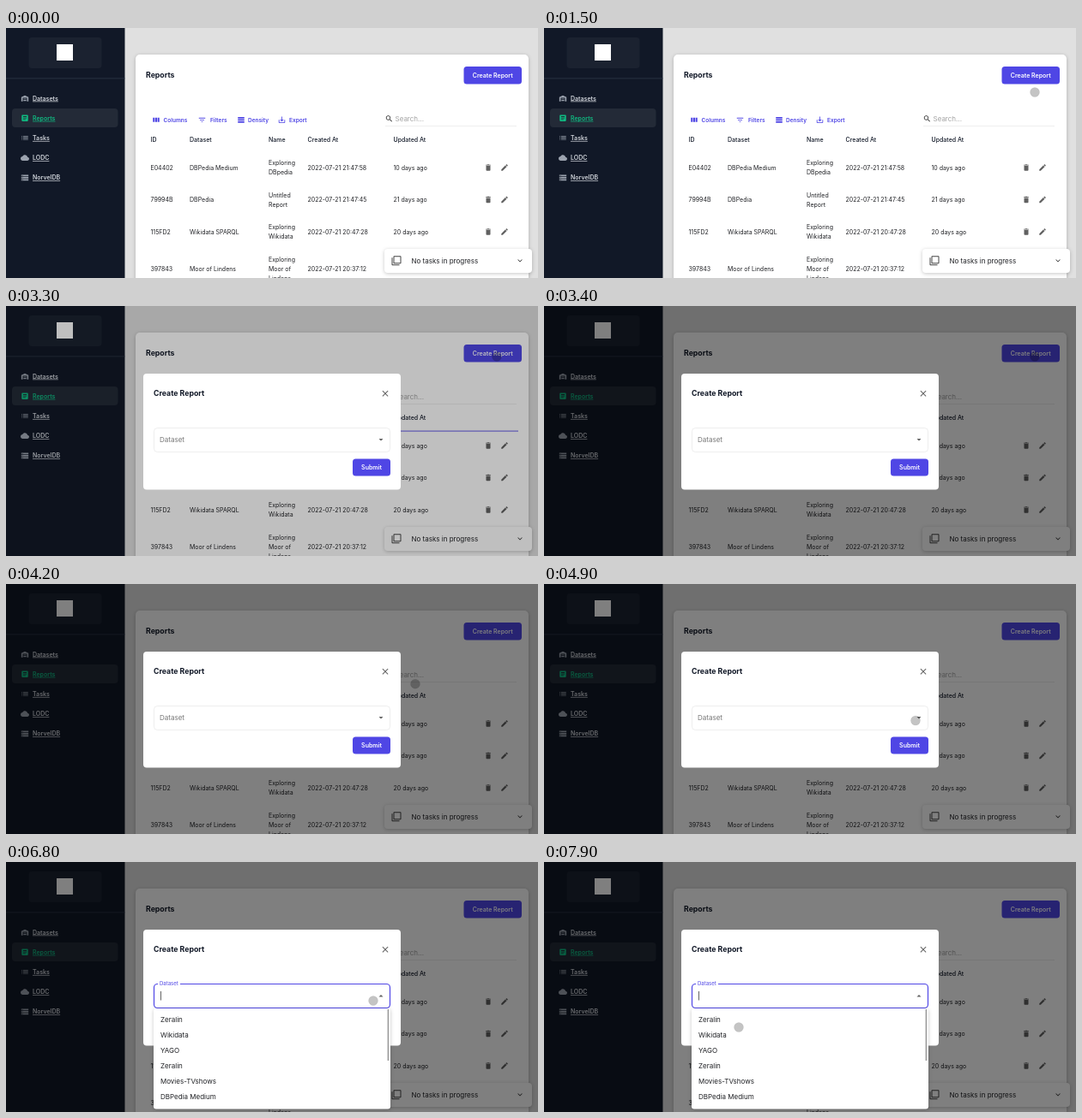
An HTML page that plays this animation: 620x292 px, repeating every 8 s.

```html
<!DOCTYPE html>
<html lang="en">
<head>
<meta charset="utf-8">
<title>Create report</title>
<style>
html, body { margin: 0; height: 100%; overflow: hidden; background: #e0e0e0; }
svg { display: block; width: 100%; height: 100%; font-family: Inter, Roboto, sans-serif; }
.float { filter: drop-shadow(0 1px 2px rgba(0, 0, 0, .22)); }
</style>
</head>
<body>
<svg id="stage" viewBox="0 0 620 292"></svg>
<script>
const INDIGO = '#4f46e5', INK = '#111827', GREY = '#616161';

const ICONS = {
  house: 'M2 9l10-5 10 5v12h-4V11H6v10H2zM8 13h8v2H8zM8 17h8v3H8z',
  article: 'M19 3H5c-1.1 0-2 .9-2 2v14c0 1.1.9 2 2 2h14c1.1 0 2-.9 2-2V5c0-1.1-.9-2-2-2zm-5 14H7v-2h7v2zm3-4H7v-2h10v2zm0-4H7V7h10v2z',
  list: 'M3 13h2v-2H3zm0 4h2v-2H3zm0-8h2V7H3zm4 4h14v-2H7zm0 4h14v-2H7zM7 7v2h14V7z',
  cloud: 'M19.35 10.04C18.67 6.59 15.64 4 12 4 9.11 4 6.6 5.64 5.35 8.04 2.34 8.36 0 10.91 0 14c0 3.31 2.69 6 6 6h13c2.76 0 5-2.24 5-5 0-2.64-2.05-4.78-4.65-4.96z',
  storage: 'M2 20h20v-4H2v4zm2-3h2v2H4v-2zM2 4v4h20V4H2zm4 3H4V5h2v2zm-4 7h20v-4H2v4zm2-3h2v2H4v-2z',
  columns: 'M3 6h5v12H3zM9.500 6h5v12h-5zM16 6h5v12h-5z',
  filter: 'M10 18h4v-2h-4zM3 6v2h18V6zm3 7h12v-2H6z',
  density: 'M3 4h18v4H3zM3 10h18v4H3zM3 16h18v4H3z',
  save: 'M19 12v7H5v-7H3v7c0 1.1.9 2 2 2h14c1.1 0 2-.9 2-2v-7zm-6 .67l2.59-2.58L17 11.5l-5 5-5-5 1.41-1.41L11 12.67V3h2z',
  search: 'M15.500 14h-.79l-.28-.27A6.500 6.500 0 1 0 13.730 14.430l.27.28v.79l5 4.990L20.490 19zM9.500 14a4.500 4.500 0 1 1 0-9 4.500 4.500 0 0 1 0 9z',
  trash: 'M6 19c0 1.1.9 2 2 2h8c1.1 0 2-.9 2-2V7H6zM19 4h-3.5l-1-1h-5l-1 1H5v2h14z',
  pencil: 'M3 17.250V21h3.750L17.810 9.940l-3.750-3.750zM20.710 7.040c.39-.39.39-1.020 0-1.410l-2.340-2.340a1 1 0 0 0-1.410 0l-1.830 1.830 3.750 3.750z',
  stack: 'M3 5H1v16c0 1.1.9 2 2 2h16v-2H3zM21 1H7c-1.1 0-2 .9-2 2v14c0 1.1.9 2 2 2h14c1.1 0 2-.9 2-2V3c0-1.1-.9-2-2-2zm0 16H7V3h14z',
  chevron: 'M16.590 8.590L12 13.170 7.410 8.590 6 10l6 6 6-6z',
  close: 'M19 6.410L17.590 5 12 10.590 6.410 5 5 6.410 10.590 12 5 17.590 6.410 19 12 13.410 17.590 19 19 17.590 13.410 12z',
  drop: 'M7 9.500l5 5 5-5z'
};

// Text and icons are placed by their vertical centre.
const text = (x, y, str, size = 7, weight = 400, fill = '#1f2024', extra = '') =>
  `<text x="${x}" y="${y + size * .36}" font-size="${size}" font-weight="${weight}" fill="${fill}" ${extra}>${str}</text>`;
const rect = (x, y, w, h, fill, r = 0, extra = '') =>
  `<rect x="${x}" y="${y}" width="${w}" height="${h}" rx="${r}" fill="${fill}" ${extra}/>`;
const icon = (name, x, y, size, fill = GREY) =>
  `<path transform="translate(${x - size / 2} ${y - size / 2}) scale(${size / 24})" fill="${fill}" fill-rule="evenodd" d="${ICONS[name]}"/>`;
const button = (x, y, w, h, label) =>
  rect(x, y, w, h, INDIGO, 3.5) + text(x + w / 2, y + h / 2, label, 7, 600, '#fff', 'text-anchor="middle"');

function sidebar() {
  const items = [['house', 'Datasets'], ['article', 'Reports'], ['list', 'Tasks'], ['cloud', 'LODC'], ['storage', 'NorvelDB']];
  return rect(0, 0, 138.5, 292, INK) +
    rect(26.5, 11, 85, 36, '#1b2230', 4) + rect(59, 19, 19, 19, '#fff') +
    rect(0, 58.5, 138.5, .8, '#2d3748') +
    rect(7, 94, 123.5, 22, '#232a37', 4) +
    items.map(([name, label], i) => {
      const y = 82 + i * 23.2, on = i === 1;
      return icon(name, 22, y, 10, on ? '#10b981' : '#9ca3af') +
        text(31, y, label, 7, 600, on ? '#10b981' : '#d1d5db', 'text-decoration="underline"');
    }).join('');
}

function table() {
  const cols = [168.5, 214, 306, 351.5, 451.5];
  const tools = [['columns', 175, 'Columns', 183.5], ['filter', 228.5, 'Filters', 238],
    ['density', 274, 'Density', 282], ['save', 321.5, 'Export', 330]];
  const rows = [
    [163, 'E04402', 'DBPedia Medium', ['Exploring', 'DBpedia'], '21:47:58', 10],
    [200.5, '79994B', 'DBPedia', ['Untitled', 'Report'], '21:47:45', 21],
    [238, '115FD2', 'Wikidata SPARQL', ['Exploring', 'Wikidata'], '20:47:28', 20],
    [281, '397843', 'Moor of Lindens', ['Exploring', 'Moor of', 'Lindens'], '20:37:12', 20]
  ];
  return rect(151, 31, 458, 280, '#fff', 5, 'class="float"') +
    text(163, 55, 'Reports', 8.75, 700, INK) +
    button(533.5, 45, 67.5, 20.5, 'Create Report') +
    tools.map(([name, x, label, tx]) => icon(name, x, 107.3, 10, INDIGO) + text(tx, 107.3, label, 6.5, 600, INDIGO)).join('') +
    icon('search', 446.5, 106, 10, '#333') + text(453.5, 106, 'Search...', 8, 400, '#a3a3a3') +
    rect(442, 114, 153, .5, '#ddd') +
    ['ID', 'Dataset', 'Name', 'Created At', 'Updated At'].map((h, i) => text(cols[i], 130.5, h, 7, 500, INK)).join('') +
    rows.map(([y, id, set, name, time, days]) =>
      text(cols[0], y, id) + text(cols[1], y, set) +
      name.map((line, i) => text(cols[2], y + (i - (name.length - 1) / 2) * 11, line)).join('') +
      text(cols[3], y, '2022-07-21 ' + time) + text(cols[4], y, days + ' days ago') +
      icon('trash', 562, y, 10) + icon('pencil', 581, y, 10)).join('');
}

const toast = () => rect(441, 258, 172, 28, '#fff', 4, 'class="float"') +
  icon('stack', 455, 271.7, 12, '#444') + text(472.5, 271.7, 'No tasks in progress', 8) + icon('chevron', 599, 271.7, 11, '#444');

const modal = () => rect(160, 79, 300, 135.5, '#fff', 4) +
  text(172, 102, 'Create Report', 8.75, 700, INK) + icon('close', 442, 102.3, 12) +
  button(404, 178.5, 44, 20, 'Submit') +
  '<rect id="field" x="172.5" y="142.5" width="275" height="28" rx="4" fill="none"/>' +
  rect(177, 140, 26, 5, '#fff', 0, 'id="notch"') +
  '<text id="label" x="179">Dataset</text>' +
  `<g id="arrow">${icon('drop', 437, 156.3, 12)}</g>`;

const menu = () => rect(180, 151, .7, 10.5, '#222') +
  rect(172, 171, 276, 117.5, '#fff', 3, 'class="float"') +
  rect(444.7, 172, 1.3, 60, '#909090') +
  ['Zeralin', 'Wikidata', 'YAGO', 'Zeralin', 'Movies-TVshows', 'DBPedia Medium']
    .map((s, i) => text(180, 183.7 + i * 18, s, 8)).join('');

const $ = id => document.getElementById(id);
$('stage').innerHTML = rect(0, 0, 620, 292, '#e0e0e0') + sidebar() + table() +
  rect(163, 145.5, 434, 1.2, '#7a73ec', 0, 'id="loading"') + toast() +
  rect(0, 0, 620, 292, '#000', 0, 'id="shade"') +
  `<g id="modal">${modal()}</g><g id="menu">${menu()}</g>` +
  '<circle id="pointer" r="5.5" fill="#000" fill-opacity=".23" stroke="#000" stroke-opacity=".05"/>';

// Pointer path: time, x, y
const PATH = [[700, 480, 215], [1300, 576, 80], [1500, 572, 75], [2100, 572, 75], [2600, 572, 59],
  [3700, 572, 59], [4600, 409, 158], [4900, 433, 159.5], [6700, 433, 159.5], [6800, 428, 162],
  [6900, 428, 162], [7800, 236, 195], [7900, 227, 193]];

const ramp = (t, a, b) => Math.min(1, Math.max(0, (t - a) / (b - a)));
const mix = (a, b, k) => a + (b - a) * k;
const set = (id, attrs) => Object.entries(attrs).forEach(([k, v]) => $(id).setAttribute(k, v));

function pointerAt(t) {
  const i = Math.max(1, PATH.findIndex(p => p[0] >= t));
  const [a, x0, y0] = PATH[i - 1], [b, x1, y1] = PATH[i];
  const k = ramp(t, a, b), e = k * k * (3 - 2 * k);
  return { cx: mix(x0, x1, e), cy: mix(y0, y1, e), opacity: t < 700 ? 0 : 1 };
}

function draw(now) {
  const t = Math.floor(now % 8000 / 100) * 100; // ten steps per second
  const open = ramp(t, 5800, 6100), focus = open > 0;
  set('pointer', pointerAt(t));
  set('loading', { opacity: t >= 3100 && t < 3400 ? 1 : 0 });
  set('modal', { opacity: ramp(t, 3000, 3200) });
  set('shade', { opacity: .5 * ramp(t, 3200, 3400) });
  set('menu', { opacity: open });
  set('field', { stroke: focus ? INDIGO : '#e2e2e2', 'stroke-width': focus ? 1.2 : .6 });
  set('notch', { opacity: focus ? 1 : 0 });
  const size = mix(8, 6, open);
  set('label', { y: mix(156.3, 142.3, open) + size * .36, 'font-size': size, fill: focus ? INDIGO : '#757575' });
  set('arrow', { transform: focus ? 'rotate(180 437 156.3)' : '' });
  requestAnimationFrame(draw);
}
requestAnimationFrame(draw);
</script>
</body>
</html>
```
